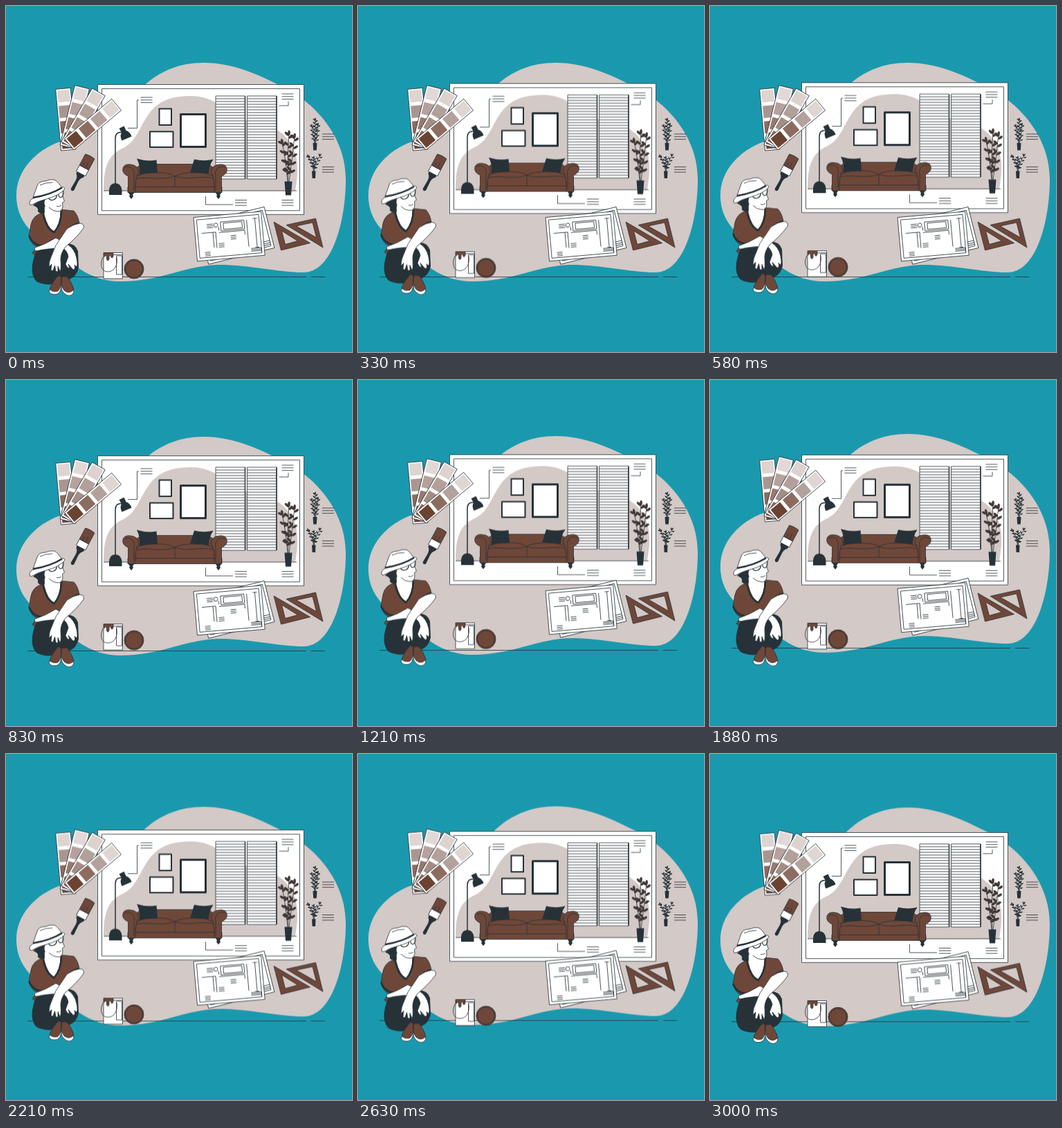
These frames come from a looping animation (500 by 500 pixels, 3040 ms). An HTML page:

```html
<!DOCTYPE html>
<html lang="en">
<head>
<meta charset="utf-8">
<title>Interior design</title>
<style>
html, body { margin: 0; width: 100%; height: 100%; overflow: hidden; background: #1a99ae; }
svg { display: block; width: 100%; height: 100%; }
.line { fill: none; stroke: #263238; stroke-width: .8; }
.white { fill: #fff; stroke: #263238; stroke-width: .8; stroke-linejoin: round; }
.brown { fill: #6f4738; stroke: #263238; stroke-width: .8; stroke-linejoin: round; }
.dark { fill: #263238; }
.taupe { fill: #d3c9c6; }
.mid { stroke-width: 1.5; }
.thick { stroke-width: 2.6; }
.leaf { fill: #4b3833; stroke: #263238; stroke-width: .4; }
.small .leaf { fill: #263238; stroke: none; }
.front { animation: front 3040ms linear infinite; }
.back { animation: back 3040ms linear infinite; }
/* 3 s bob, peak at 1.5 s */
@keyframes front {
  0% { transform: translateY(0); }
  49.342% { transform: translateY(-7px); }
  98.684% { transform: translateY(0); }
  100% { transform: translateY(-.187px); }
}
/* same bob one second later, cut off by the loop */
@keyframes back {
  0%, 32.895% { transform: translateY(0); }
  82.237% { transform: translateY(-7px); }
  100% { transform: translateY(-4.48px); }
}
</style>
</head>
<body>
<svg viewBox="0 0 500 500">
  <g class="back">
    <path class="taupe" d="M15 274C15 238 42 209 78 196C112 186 140 185 165 155C185 130 215 82 286 82C328 82 364 99 396 115C448 139 491 190 491 250C491 310 472 385 430 385C395 385 350 374 310 374C260 374 225 398 165 398C120 398 95 372 50 336C28 322 15 300 15 274Z"/>
    <path class="line" d="M31 391.5H434M441 391.5H461"/>
  </g>

  <g class="small" id="shelf">
    <path class="dark" d="M443.5 198H449.5L448.8 208.5H444.2ZM442 238.5H447.5L447 249H442.6Z"/>
  </g>

  <g class="front" id="board">
    <path class="white" d="M132.5 113.5H430.5V301.3H132.5Z"/>
    <path class="line" d="M138.5 119.5H424.5V295.7H138.5Z"/>
    <path class="taupe" d="M141 267C141 225 152 213 170 205C204 188 192 130 266 130C310 130 320 160 345 165C390 170 421 190 421 235C421 250 419 260 418 267Z"/>
    <path class="line" d="M141 267H420"/>
    <path class="line" d="M176 176.5H189.5V136H192M408 138V144H394.5M288.5 275V287H328"/>
    <path class="white" style="stroke-width:2" d="M221.5 148.5H239V172H221.5ZM208 181.5H241.5V204H208Z"/>
    <path class="white" style="stroke-width:3" d="M252.5 156.5H288.5V203.5H252.5Z"/>
    <g id="blinds"></g>

    <path class="line mid" d="M158 258V191Q158 182 167 182.5"/>
    <path class="dark" d="M149 273V266Q150 256 158 256Q166 256 167.5 266V273ZM163.5 177L170.5 173.5L173.5 180Q179.5 182 181.5 188.5L167.5 194.5Q164 188 167 183Z"/>

    <path class="brown" d="M186 238Q189 228.5 205 228.5H283Q299 228.5 302 238V260H186Z"/>
    <path class="dark" d="M189 220.500Q203 225 217.500 222.500L219 241Q206 241 192.500 244.500Q195 232 189 220.500ZM299.500 221.500Q286 225 272 221.500L266 241Q281 240 292.500 244.500Q293 231 299.500 221.500Z"/>
    <path class="brown" d="M187 248Q193 241 215 241Q236 240 244 246Q254 240 275 241Q296 241 301 248V263H187Z"/>
    <path class="line" d="M187 250Q195 247 215 249Q234 250 244 246Q254 250 275 248Q295 246 301 250M244 246V261"/>
    <path class="brown" d="M176 261.5H312V269.5H176Z"/>
    <g id="arm">
      <path class="brown" d="M169 234Q171 228 180 229Q191 230 192 240Q187 247 187 262V269.5H176.5V246Q167 242 169 234Z"/>
      <path class="line" d="M171 234Q177 230 183 235Q187 240 185 247V267"/>
      <path class="dark" d="M177 270H185L183 273L184 275L181.5 278.5H180.5L178 275L179 273Z"/>
    </g>
    <use href="#arm" transform="translate(488) scale(-1 1)"/>
    <g id="plant"><path class="dark" d="M402.5 253.5H413.5L412 273.5H404Z"/></g>
  </g>

  <g class="back">
    <g id="fan"></g>
    <g transform="translate(95 267) rotate(28)">
      <path class="dark" d="M-2.5 -2L-2 -16Q-2 -22 -6 -25V-30H6V-25Q2 -22 2 -16L2.5 -2Q0 2 -2.5 -2Z"/>
      <path class="white" d="M-7.5 -38H7.5V-28H-7.5Z"/>
      <path class="brown" d="M-7.5 -38V-56Q0 -58 7.5 -56V-38Z"/>
      <path class="line" d="M-3 -39V-45M2 -39V-47"/>
    </g>

    <g transform="translate(278 314) rotate(-14)">
      <path class="white" d="M0 0H98V61H0Z"/>
      <path class="line" d="M4 4H94V57H4ZM78 49H94M78 52H94M78 54.5H94"/>
    </g>
    <g transform="translate(271 305.5) rotate(-5)">
      <path class="white" d="M0 0H98V63.5H0Z"/>
      <path class="line" d="M4 4H94V59.5H4ZM38 10H72V23H38ZM42 12H69V21H42ZM10 24H30V47M26 24V46M35 17V22M35 25H72V31M76 10V49M88 9V51M85 9H91M85 51H91M79 52H94V59M79 54H94M79 56H94"/>
      <path class="line" d="M18 12H27M18 14.5H27M18 17H27M33 41H41M33 43.5H41M33 46H41M51 31H59M51 33.5H59M51 36H59M12 52H20M12 54.5H20M12 57H20"/>
      <circle class="line" cx="31" cy="14" r="3"/>
    </g>
    <g class="brown" fill-rule="evenodd">
      <path d="M387 312L397.5 353L439.5 342.5ZM398.5 325L403.5 344.500L421.500 339.500Z"/>
      <path d="M405 316.5L447.5 307L458 349ZM419.500 318L443 313L448.500 334.500Z"/>
    </g>
  </g>

  <g class="front">
    <!-- paint can and lid -->
    <path class="white" d="M141 356.5H168.5V394H141Z"/>
    <path class="line" d="M141 359.5H168.5M159.5 361H167.5V388H159.5Z"/>
    <path class="brown" d="M141.5 356.5H155V362Q153 366 151.5 362V360.5Q150 359 149 362V366Q147 370 145.5 366V361Q143 360 141.5 363Z"/>
    <path class="line" d="M140 363C135 374 138 384 147 384C157 384 162 374 160 363"/>
    <circle class="brown" cx="185" cy="380" r="14"/>
    <circle class="line" cx="185" cy="380" r="12.3"/>

    <!-- seated woman: body -->
    <path class="brown" d="M53 299Q39 302 36 316L33 333Q37 345 45 348L38 357L46 364H92L91 322L106 314Q104 302 98 296L78 294Z"/>
    <path class="white" d="M56 288L55 301Q60 322 70 326Q79 314 79 297L75 290Z"/>
    <path class="line thick" d="M53.500 300Q58 322 69.500 327Q80 315 80 296"/>
    <path class="line thick" d="M33.500 332Q38 346 56 347"/>
    <path class="line thick" d="M106 313.500Q97 316 90 322"/>
    <path class="dark" d="M44 354Q58 342 76 346Q98 338 104 354L105 378Q102 391 92 395L76 401Q56 405 44 398Q36 390 38 374Q40 362 44 354Z"/>
    <path class="white" d="M42 349Q56 345 72 335L88 344Q99 350 102 364Q104 374 102 377L99 374Q101 381 97 381L90 373L92 379Q88 379 86 373L90 362Q88 353 82 350Q60 350 44 354Q40 353 42 349Z"/>
    <path class="white" d="M88 322Q98 315 107 314Q114 315 112 321Q103 334 86 348Q79 357 79 366Q80 382 78 383.500L75 376V384L72 383.500L70.500 375L68 382.500L65 382L66 373L62 377Q62 368 67 358Q71 345 80 334Z"/>
    <path class="white" d="M77 404Q64 408 62 412Q64 418 73 416.5Q79 415 80 404ZM80 404Q79 413 88 418Q96 420 98 413L96 404Z"/>
    <path class="brown" d="M76 389Q66 400 63 409Q67 414 75 412Q80 408 80 392ZM81 391Q78 404 84 411Q91 417 98 410Q94 397 88 391Z"/>

    <!-- head -->
    <path class="dark" d="M39 288Q47 281 57 278L59 288Q53 289 56 298Q51 303 46 297Q48 291 39 288Z"/>
    <path fill="#fff" d="M56 281Q62 273 80 264L81.500 274L84.500 282L81.500 284L82 290Q81 297 75 297Q67 297 60 290Q54 290 56 281Z"/>
    <path class="line" d="M81.500 274L84.500 282L81.500 284L82 290Q81 297 75 297Q68 297 62 291"/>
    <path class="line" d="M73 289.500Q77 290.500 80 288M56 279L61 276M63 270L70 267"/>
    <g class="line" style="stroke-width:1.2">
      <path d="M60.500 273Q72 267 73.500 270.500Q74 280 67 280.500Q61 281 60.500 273ZM75.500 269.500Q82 265 83 268Q83 276 79.500 276.500Q75.500 277 75.500 269.500Z"/>
    </g>
    <path class="white" d="M39 277L45 260Q47 253 57 253Q63 250 70 251Q75 253 82 265Q63 277 39 277Z"/>
    <path class="white" d="M34 285Q34 280 41 277Q64 273 80 262Q85 261 85 264.5Q77 274 58 279Q46 282 37 287.5Q34 288 34 285Z"/>
    <path class="line thick" d="M39 277Q64 273 81 262.500"/>
    <path class="line" d="M49 259Q56 255 67 255"/>
  </g>
</svg>
<script>
const ns = 'http://www.w3.org/2000/svg';
const byId = id => document.getElementById(id);

function add(parent, tag, attrs) {
  const el = document.createElementNS(ns, tag);
  for (const key in attrs) el.setAttribute(key, attrs[key]);
  return parent.appendChild(el);
}

function note(parent, x, y) {
  const d = [0, 3.8, 7.6].map(dy => `M${x} ${y + dy}h17`).join('');
  add(parent, 'path', { class: 'line', d });
}

function blind(x) {
  const box = byId('blinds');
  add(box, 'path', { class: 'white', d: `M${x} 130h42.5v120h-42.5Z` });
  let d = '';
  for (let y = 134; y < 249; y += 4) d += `M${x} ${y}h42.5`;
  add(box, 'path', { class: 'line', d });
  add(box, 'path', { class: 'line mid', d: `M${x + 42.5} 130v120` });
}

// curved stem from (x0,y0) to (x2,y2) with paired leaves
function stem(parent, x0, y0, x1, y1, x2, y2, pairs, size) {
  add(parent, 'path', { class: 'line', d: `M${x0} ${y0}Q${x1} ${y1} ${x2} ${y2}` });
  const leaf = (x, y, deg) => add(parent, 'ellipse', {
    class: 'leaf', cx: size, rx: size, ry: size * .45,
    transform: `translate(${x} ${y}) rotate(${deg})`
  });
  for (let i = 0; i < pairs; i++) {
    const t = .25 + .7 * i / (pairs - 1), u = 1 - t;
    const x = u * u * x0 + 2 * u * t * x1 + t * t * x2;
    const y = u * u * y0 + 2 * u * t * y1 + t * t * y2;
    const dir = Math.atan2(u * (y1 - y0) + t * (y2 - y1), u * (x1 - x0) + t * (x2 - x1)) * 180 / Math.PI;
    leaf(x, y, dir - 52);
    leaf(x, y + size, dir + 52);
    if (i === pairs - 1) leaf(x, y, dir);
  }
}

function strip(x, y, deg, colors) {
  const g = add(byId('fan'), 'g', { transform: `translate(${x} ${y}) rotate(${deg})` });
  add(g, 'path', { class: 'white', d: 'M0 0H21.5V-89H0Z' });
  colors.forEach((fill, i) => add(g, 'rect', { x: 2.2, y: -87 + i * 22.4, width: 17.2, height: 17.5, fill }));
}

const board = byId('board'), shelf = byId('shelf'), plant = byId('plant');
blind(303);
blind(348.5);
note(board, 194.5, 132);
note(board, 398.5, 127);
note(board, 331, 280.5);
note(board, 398.5, 280.5);
note(shelf, 457, 185);
note(shelf, 457, 232.5);

stem(plant, 408, 254, 406, 225, 409, 183, 5, 3.7);
stem(plant, 407, 254, 405, 225, 399, 196, 4, 3.5);
stem(plant, 409, 254, 414, 220, 417, 188, 5, 3.6);
stem(shelf, 446.5, 199, 447, 180, 447, 164, 6, 2.1);
stem(shelf, 446, 199, 443, 187, 442, 173, 4, 1.9);
stem(shelf, 447, 199, 450, 187, 451, 171, 4, 1.9);
stem(shelf, 444.5, 239, 443, 226, 437, 217, 4, 2);
stem(shelf, 445, 239, 445, 226, 445, 220, 4, 1.9);
stem(shelf, 445, 239, 447, 226, 454, 216, 4, 2);

strip(79.5, 209, -5, ['#ded4d2', '#ab968f', '#8c6a5f', '#6f4738']);
strip(78, 201, 14, ['#e2d9d7', '#b5a29c', '#98796f', '#7d574a']);
strip(80, 196, 30, ['#ddd2cf', '#b3a09a', '#a48d85', '#8a685c']);
strip(84.5, 191.5, 50, ['#dfd5d3', '#b3a19b', '#8c6c61', '#6b4333']);
</script>
</body>
</html>
```
